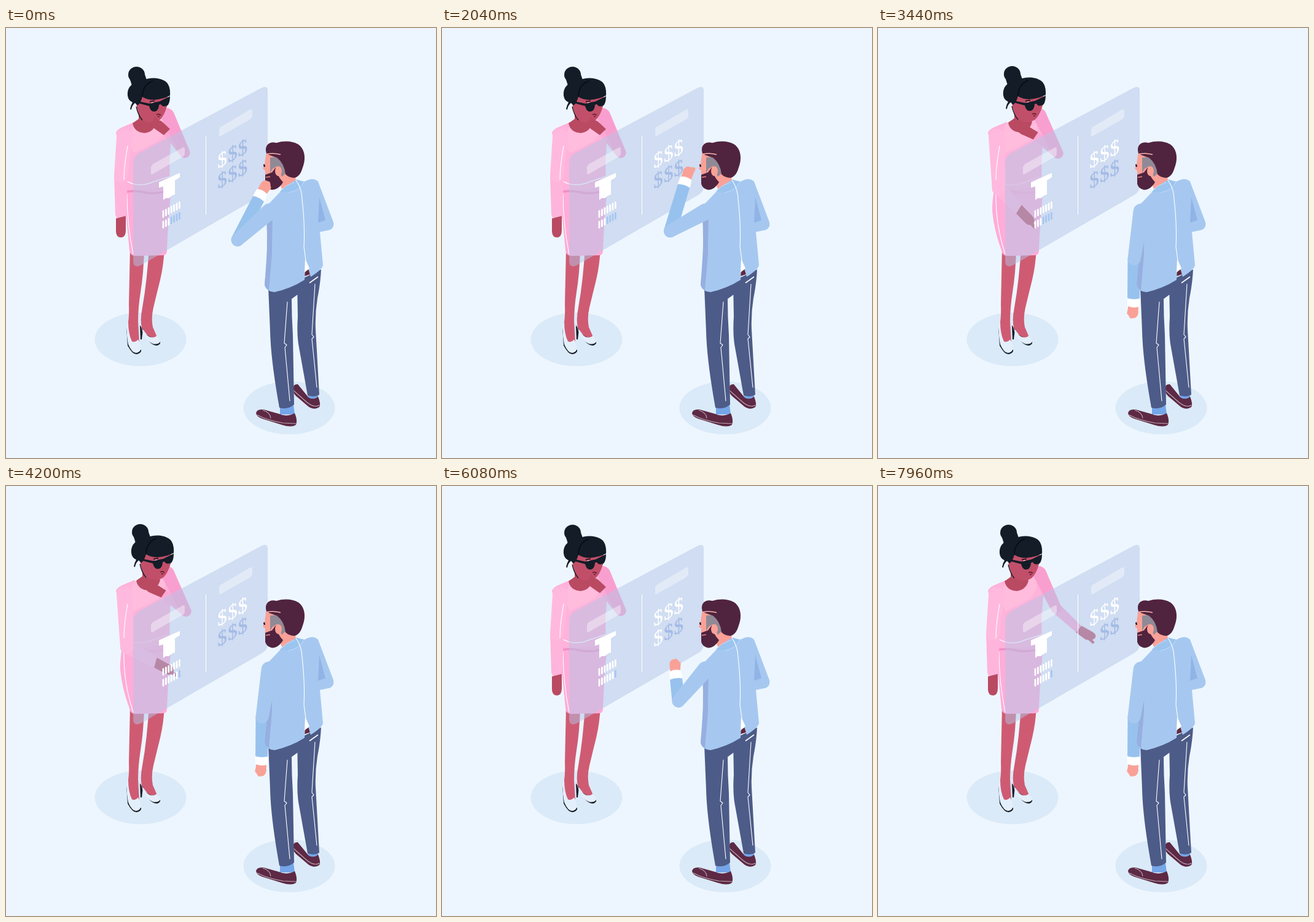
An HTML page that plays this animation: 700 by 700 pixels, repeating every 8000 ms.

```html
<!DOCTYPE html>
<html lang="en">
<head>
<meta charset="utf-8">
<title>Shared screen</title>
<style>
html, body { margin: 0; width: 100%; height: 100%; overflow: hidden; background: #edf6fe; }
svg { display: block; width: 100vw; height: 100vh; }
.skin { fill: #cf5b73; }
.shade { fill: #b94a62; }
.face { fill: #c24f69; }
.ink { fill: #131c27; }
.shoe { fill: #e4effc; }
.peach { fill: #f9a197; }
.hair { fill: #50233f; }
.leather { fill: #5d2944; }
.coat { fill: #a6c8f0; }
.pants { fill: #4d5b88; }
.line { fill: none; stroke: #fff; stroke-width: 1.1; stroke-linecap: round; stroke-linejoin: round; }
.round { stroke-linecap: round; }
text { font: 34px "Liberation Serif", "Noto Serif", serif; text-anchor: middle; stroke-width: .3; }
</style>
</head>
<body>
<svg viewBox="0 0 700 700" xmlns="http://www.w3.org/2000/svg">
  <g fill="#dbeaf8">
    <ellipse cx="219" cy="507" rx="74.500" ry="43.500"/>
    <ellipse cx="461" cy="618.500" rx="74.500" ry="43"/>
  </g>

  <g id="woman">
    <path class="ink" d="M218 484L223 490L221 507L219 507Z"/>
    <path class="skin" d="M233 355L258 355Q257 385 251 410Q245 434 240 455Q236 472 239 487L246 503L236 508L221 488Q218 474 222 455Q230 410 233 355Z"/>
    <path class="ink" d="M224 497L230 507Q238 517 246 517Q252 515 251 511Z"/>
    <path class="shoe" d="M219 484Q224 498 234 503Q242 505 245 501Q250 506 251 511Q247 516 239 514Q229 510 224 499Z"/>
    <path class="skin" d="M202 360L225 360Q224 400 219 430Q215 456 215 478L217 512L202 514L197 488Q201 474 200 450Z"/>
    <path class="ink" d="M196 488L198 517Q206 532 213 531Q221 529 220 524L202 518Z"/>
    <path class="shoe" d="M199 478Q194 488 199 515Q205 529 212 529Q220 527 219 521Q219 513 215 507Q210 513 205 510Q199 498 199 478Z"/>

    <path id="skirt" fill="#ffacd8"/>
    <path d="M179 171Q180 166 188 162L209 153Q224 167 240 157L258 132Q266 127 270 136L274 155Q264 195 267 252Q235 268 192 262L190 210Z" fill="#ffb2da"/>
    <path d="M208 154Q224 169 242 155L262 134Q262 172 246 185Q226 196 207 204Q199 180 208 154Z" fill="#ffbcdc"/>
    <g id="belt" fill="none" stroke-linecap="round">
      <path d="M193 247Q214 262 241 250L266 242" stroke="#fff" stroke-width="1.500"/>
      <path d="M193 267Q209 264 222 267Q246 273 270 262" stroke="#f090c4" stroke-width="3.500"/>
    </g>
    <path id="hem" class="line"/>
    <path id="wFarFore" fill="#fbaad6"/>
    <path id="wFarUpper" fill="#f99fd0"/>

    <g id="head">
      <path class="shade" d="M216 138L216 148L206 155Q209 170 226 171Q241 169 245 154L238 142Z"/>
      <path class="face" d="M211 104L263 100L263 124Q258 143 250 150Q239 157 227 152Q217 147 213 130Z"/>
      <path d="M212 128Q215 142 222 150" fill="none" stroke="#131c27" stroke-width="1.300"/>
      <ellipse class="ink" cx="212.500" cy="76" rx="13.500" ry="13"/>
      <path class="ink" d="M202 84L224 70L231 90L206 97Z"/>
      <path class="ink" d="M198 110C197 94 208 88 221 86C238 78 255 82 262 89Q268 96 267 110Q255 116 241 117Q229 117 222 112Q219 123 214 126L210 122Q205 126 204 133L202 132Q203 126 206 121Q199 118 198 110Z"/>
      <path d="M222 112Q222 93 239 86" fill="none" stroke="#070c12" stroke-width="1.500"/>
      <path class="ink" d="M214 119L233 123L250 119.500L267 111Q267 122 263 126Q255 130 252 124L249 125Q249 131 245 135Q236 139 233 127L214 122Z"/>
      <path d="M234 120L242 118.500" stroke="#3a1522" stroke-width="2"/>
      <path d="M236 122L240 121" stroke="#f6d4de" stroke-width="1.200"/>
      <path d="M245 141Q249 139 252 142M247 144L250 144" fill="none" stroke="#59192f" stroke-width="1.500"/>
    </g>
    <g id="wFarHand">
      <path id="wFarFinger" class="round" fill="none" stroke="#b94a62" stroke-width="4.500"/>
      <path class="shade" d="M-5 -7L11 -11Q23 -15 25 -8Q25 0 15 5L-4 7Z"/>
    </g>
    <path id="wNearFore" fill="#ffb4dc"/>
    <g id="wNearHand">
      <path id="wNearFinger" class="round" fill="none" stroke="#b94a62" stroke-width="5"/>
      <path class="shade" d="M3 -8L26 -8Q37 -8 38 -1Q38 8 28 8L7 8Z"/>
    </g>
    <path id="wNearUpper" fill="#ffb9de"/>
    <path class="line" d="M198 192Q192 225 192 247"/>
  </g>

  <g id="panel">
    <path d="M207 220Q207 210 216 204L415 98Q426 92 426 102L426 258Q426 267 417 272L220 386Q207 392 207 379Z" fill="#b3c6e8" fill-opacity=".5"/>
    <g fill="#fff" fill-opacity=".38">
      <path d="M236 228Q236 224 240 221L287 195Q291 193 291 197L291 204Q291 208 287 210L240 237Q236 240 236 236Z"/>
      <path d="M347 166Q347 162 351 160L397 133Q401 131 401 135L401 143Q401 146 397 149L351 175Q347 178 347 174Z"/>
    </g>
    <path class="line" d="M325.500 177L325.500 303"/>
    <path d="M249 251L283 236L283 243L275 248L275 271L270 273L265 277L260 277L256 280L256 258L249 260Z" fill="#fff"/>
    <g id="bars" class="round" stroke-width="2.800"></g>
    <g id="dollars"></g>
  </g>

  <g id="man">
    <path class="peach" d="M424 200L421 222L418 229L422 232L422 240L446 254L449 262L473 251L468 232L446 205Z"/>
    <path d="M420 222L421 226" stroke="#38182c" stroke-width="2.500"/>
    <path d="M430 211L447 209Q456 222 456 236L449 242L441 225L434 229L430 236Z" fill="#908a96"/>
    <path class="hair" d="M424 204C420 192 428 184 440 187C453 183 466 184 475 189C488 197 488 215 483 227C480 238 475 243 469 244Q459 243 455 238Q453 220 441 211L429 207Z"/>
    <path d="M425 205Q436 203 447 206" fill="none" stroke="#f9b8ad" stroke-width="1.500"/>
    <path class="hair" d="M422 239L433 235L439 227Q442 242 451 251Q444 263 433 263.500Q423 261 422 253Z"/>
    <path d="M423 243L430 242" stroke="#e8897f" stroke-width="1.400"/>
    <ellipse class="peach" cx="443.500" cy="233" rx="5.500" ry="8"/>

    <path id="mFore" fill="#98c2ee"/>
    <g id="mHand">
      <path id="mFinger" class="round" fill="none" stroke="#f9a197" stroke-width="6.500"/>
      <path class="peach" d="M4 -8L20 -8Q29 -9 32 -3L33 4Q29 9 22 9L4 8Z"/>
      <path d="M0 -10.500L13 -9.500Q17 0 13 9.500L0 10.500Q3 0 0 -10.500Z" fill="#fff"/>
    </g>

    <path d="M446 618L468 613L470 629L446 629ZM491 598L508 594L508 607L494 607Z" fill="#75a6e9"/>
    <path class="leather" d="M407 627Q408 620 419 621L444 628Q457 634 470 627Q475 639 472 646Q465 651 449 646L417 636Q408 633 407 627ZM467 587Q468 579 475 580L493 602Q502 606 508 600Q513 613 510 617Q502 623 492 616L472 599Q467 594 467 587Z"/>
    <path class="line" d="M409 630Q426 639 451 643L472 644M418 622Q430 626 431 635M468 590L486 606Q501 620 510 614" opacity=".6"/>
    <path class="pants" d="M474 412L513 393Q512 415 507 440Q503 465 504 490L510 597Q502 602 491 598L477 520Q473 500 475 470Z"/>
    <path class="pants" d="M427 422L482 408L476 433L465 441Q465 470 467 500L469 613Q458 622 445 618Q431 540 430 494Z"/>
    <path class="line" d="M458 446L453 513L457 516L454 520L462 607M503 417L498 499L501 503L498 506L506 585"/>
    <path d="M494 415L508 405" stroke="#fff" stroke-width="1.600"/>
    <path d="M484 398L498 390L498 400L486 404Z" fill="#61283f"/>

    <path class="coat" d="M428 286L447 266Q460 253 473 247L486 250Q500 242 508 250L533 316Q535 326 526 329L511 332L516 386Q515 393 496 405L488 378L486 410Q464 424 437 430Q424 429 421 419L427 330Z"/>
    <path d="M424 307L434 307Q433 345 433 368L428 427Q422 424 421 417Q427 365 424 307Z" fill="#96afe0"/>
    <path d="M510 275L520 313L508 317Z" fill="#91b4e6"/>
    <path d="M446 266Q463 251 474 247L485 251Q478 264 460 268Z" fill="#9bc4ef"/>
    <path d="M448 264L456 257L470 251M485 251Q477 265 460 268" fill="none" stroke="#c2dcf8" stroke-width="1"/>
    <path class="line" d="M472 248Q481 260 482 278Q487 325 485 356L488 378"/>
    <path d="M487 376L494 391L486 398Z" fill="#fff"/>
    <path id="mUpper" class="coat"/>
  </g>
</svg>

<script>
const LOOP = 8000;
const $ = id => document.getElementById(id);
const set = (id, name, value) => $(id).setAttribute(name, value);

function add(parent, tag, attrs, text = "") {
  const el = document.createElementNS("http://www.w3.org/2000/svg", tag);
  for (const k in attrs) el.setAttribute(k, attrs[k]);
  el.textContent = text;
  $(parent).append(el);
  return el;
}

// Time each mark turns white; Infinity keeps it blue.
const barTimes = [0, 0, 0, 3560, 3840, 4120, Infinity];
const dollarTimes = [0, 1200, 1720, 5640, Infinity, Infinity];
const marks = [];
for (let row = 0; row < 2; row++) {
  for (let i = 0; i < 7; i++) {
    const x = 256 + i * 4.4, y = 298 + row * 17.5 - i * 2.4;
    const el = add("bars", "path", { d: `M${x} ${y}v9.500` });
    marks.push({ el, at: row ? barTimes[i] : 0, off: "#a7c7f1", name: "stroke" });
  }
}
const dollars = dollarTimes.map((at, i) => {
  const x = 352 + i % 3 * 16.7, y = 214 + (i > 2) * 33 - i % 3 * 9.4;
  const el = add("dollars", "text", { y: 11, transform: `translate(${x} ${y}) skewY(-27) scale(.92 1)` }, "$");
  marks.push({ el, at, off: "#a4bbe5", name: "fill" }, { el, at, off: "#a4bbe5", name: "stroke" });
  return el;
});

// Poses: elbow x, y, wrist x, y, finger reach.
const chin = [377, 345, 411, 278, 0];
const down = [417, 376, 416, 440, 0];
const manArm = [
  [0, ...chin], [520, ...chin],
  [1200, 364, 320, 363, 246, 1], [1400, 364, 320, 363, 246, 1],
  [1680, 366, 316, 376, 236, 1], [1800, 366, 316, 376, 236, 1],
  [2280, ...chin], [2780, ...chin],
  [2960, 381, 348, 396, 311, 0], [3440, ...down], [5120, ...down],
  [5640, 366, 328, 358, 277, 1], [5800, 366, 328, 358, 277, 1],
  [6080, 385, 350, 381, 314, 0], [6640, ...down], [LOOP, ...down]
];
const hang = [187, 240, 187, 303, 0];
const nearArm = [
  [0, ...hang], [2920, ...hang],
  [3500, 197, 262, 227, 291, 1], [3600, 197, 262, 227, 291, 1],
  [4120, 197, 262, 239, 285, 1], [4400, 197, 262, 239, 285, 1],
  [5000, 187, 243, 190, 303, 0], [5160, ...hang], [LOOP, ...hang]
];
const think = [291, 203, 259, 166, .8];
const lean = [293, 204, 253, 173, 0];
const farArm = [
  [0, ...think], [2780, ...think], [3500, ...lean], [4440, ...lean],
  [5160, ...think], [7300, ...think], [7920, 290, 199, 330, 236, 1], [LOOP, 290, 199, 330, 236, 1]
];
const sway = [[0, 0], [2780, 0], [2960, .22], [3500, 1], [4400, 1], [5000, .07], [5160, 0], [LOOP, 0]];

// Monotone cubic through the keys: rests where a value repeats or turns.
function sample(track, t) {
  let i = 0;
  while (i < track.length - 2 && t >= track[i + 1][0]) i++;
  const [a, b] = [track[i], track[i + 1]];
  const span = b[0] - a[0], u = (t - a[0]) / span;
  const slope = (n, k) => n < 0 || n > track.length - 2 ? 0 :
    (track[n + 1][k] - track[n][k]) / (track[n + 1][0] - track[n][0]);
  const tangent = (n, k) => {
    const p = slope(n - 1, k), q = slope(n, k);
    return p * q > 0 ? 2 * p * q / (p + q) : 0;
  };
  return a.slice(1).map((v, j) => {
    const k = j + 1, h = u * u * (3 - 2 * u);
    return v + (b[k] - v) * h +
      span * (tangent(i, k) * u * (1 - u) ** 2 - tangent(i + 1, k) * u * u * (1 - u));
  });
}

function limb(x1, y1, r1, x2, y2, r2) {
  const a = Math.atan2(y2 - y1, x2 - x1), nx = -Math.sin(a), ny = Math.cos(a);
  const at = (x, y, r) => `${x + nx * r} ${y + ny * r}`;
  return `M${at(x1, y1, r1)}A${r1} ${r1} 0 0 1 ${at(x1, y1, -r1)}` +
    `L${at(x2, y2, -r2)}A${r2} ${r2} 0 0 1 ${at(x2, y2, r2)}Z`;
}

function arm(name, shoulder, radii, pose, reach) {
  const [ex, ey, wx, wy, finger] = pose, [rs, re, rw] = radii;
  set(name + "Upper", "d", limb(...shoulder, rs, ex, ey, re));
  set(name + "Fore", "d", limb(ex, ey, re, wx, wy, rw));
  const angle = Math.atan2(wy - ey, wx - ex) * 180 / Math.PI;
  set(name + "Hand", "transform", `translate(${wx} ${wy}) rotate(${angle})`);
  const [from, to, side] = reach;
  set(name + "Finger", "d", `M10 ${side * .6}L${from + (to - from) * finger} ${side}`);
}

function draw(t) {
  const [p] = sample(sway, t);
  const hip = 195 - 9 * p;
  set("head", "transform", `translate(${6 * p} ${-p})`);
  set("skirt", "d", `M${194 - 4 * p} 255Q${hip - 1} 285 ${hip} 300Q${hip + 3} 330 201 362Q202 371 211 371L256 370Q262 370 262 362Q264 310 270 250Z`);
  set("hem", "d", `M${197 - 5 * p} 270Q${197 - 6 * p} 320 207 368`);
  set("belt", "opacity", 1 - .7 * p);
  arm("m", [429, 299], [13.5, 10.5, 10], sample(manArm, t), [24, 37, 7]);
  arm("wNear", [193, 177], [13, 11, 9], sample(nearArm, t), [28, 44, 2]);
  arm("wFar", [263, 142], [11, 8.5, 6.5], sample(farArm, t), [14, 27, 0]);
  for (const m of marks) m.el.setAttribute(m.name, t >= m.at ? "#fff" : m.off);
  dollars[3].setAttribute("visibility", t >= 7880 ? "hidden" : "visible");
}

const start = performance.now();
function tick() {
  draw((performance.now() - start) % LOOP);
  requestAnimationFrame(tick);
}
tick();
</script>
</body>
</html>
```
